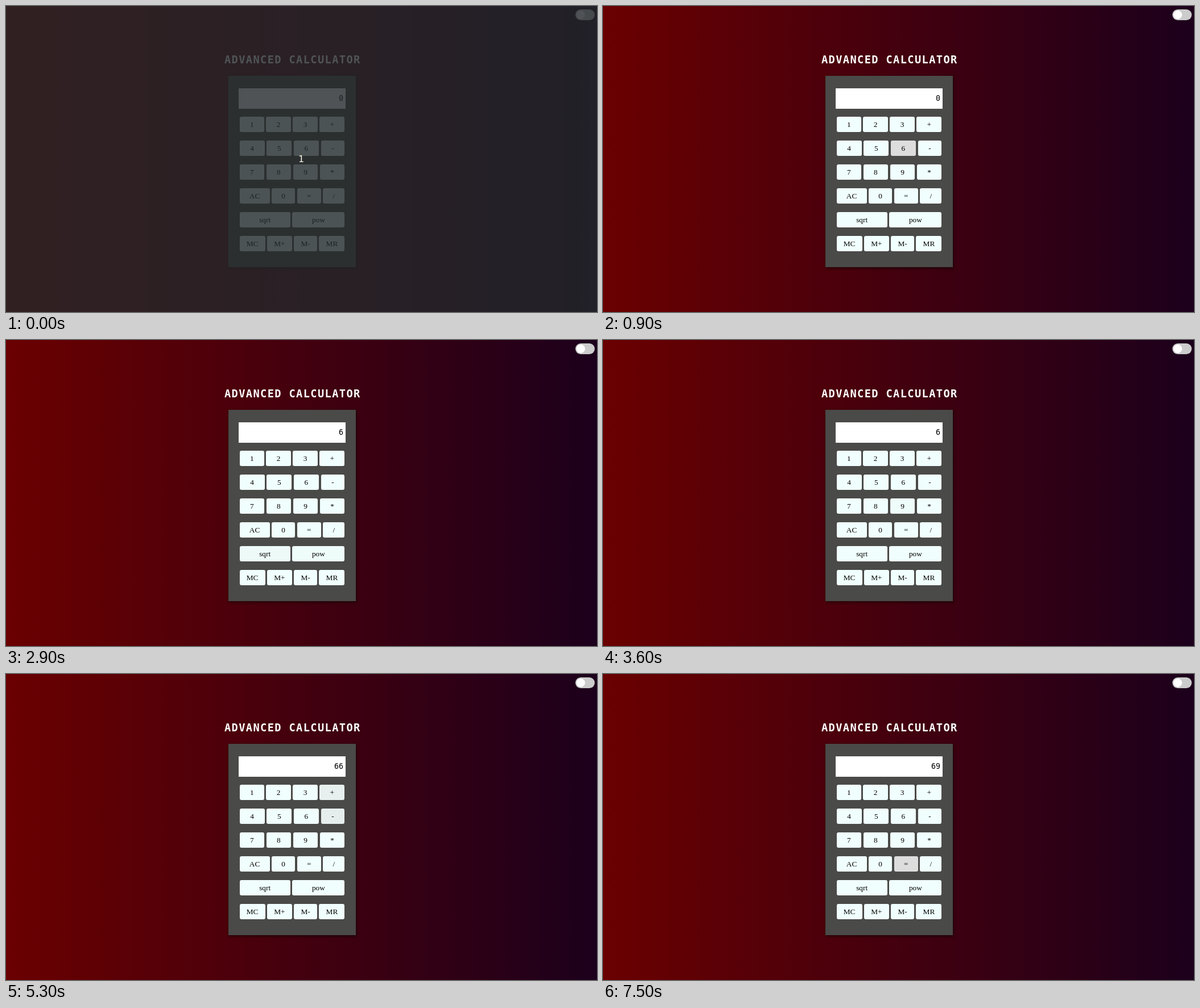
Animation of 1039 by 539 pixels, one loop 8000 ms. Source, as an HTML page:

```html
<!DOCTYPE html>
<html lang="en">
<head>
<meta charset="utf-8">
<title>Calculator</title>
<style>
  html, body { margin: 0; width: 100%; height: 100%; overflow: hidden; }
  body { position: relative; background: linear-gradient(to right, #6a0000, #1c001c); }
  body > * { position: absolute; box-sizing: border-box; }
  #title {
    left: 384px; top: 83px; color: #fff; white-space: pre;
    font: bold 18.7px/24px "DejaVu Sans Mono", monospace; letter-spacing: 1.36px;
  }
  #panel {
    left: 391px; top: 123px; width: 224px; height: 337px;
    background: #4a4a48; box-shadow: 1px 2px 5px rgba(0, 0, 0, .6);
  }
  #display {
    left: 409px; top: 145px; width: 188px; height: 36px; padding-right: 4px;
    background: #fff; color: #000; text-align: right;
    font: 13.33px/35px "DejaVu Sans Mono", monospace;
  }
  .row { left: 410.6px; width: 184.8px; height: 27px; display: flex; gap: 3.6px; }
  .row span {
    flex: 1 1 auto; border-radius: 3px; text-align: center; color: #000;
    font: 13.33px/27px "Liberation Serif", serif;
  }
  #switch { left: 1001px; top: 6px; width: 34px; height: 19px; border-radius: 10px; background: #ccc; }
  #knob { left: 1003px; top: 8px; width: 15px; height: 15px; border-radius: 50%; background: #fff; }
  #veil { inset: 0; background: rgba(36, 40, 43, .8); }
  #count {
    left: 499px; top: 260px; width: 40px; text-align: center; color: #fff8ea;
    font: 16px/20px "DejaVu Sans", sans-serif;
  }
</style>
</head>
<body>
<div id="title">ADVANCED CALCULATOR</div>
<div id="panel"></div>
<div id="display">0</div>
<div id="switch"></div>
<div id="knob"></div>
<script>
const LOOP = 8000, STEP = 100, FADE = 300;
const IDLE = [240, 255, 253], HOVER = [221, 221, 221];

// Pointer visits: key, time entered, time left
const visits = [
  ['5', 530, 620], ['6', 610, 2150],
  ['9', 2150, 2210], ['=', 2210, 2290], ['pow', 2290, 2380],
  ['sqrt', 2380, 2720], ['pow', 2620, 2720], ['M+', 2970, 3080],
  ['=', 3120, 3240], ['9', 3230, 3400],
  ['6', 3750, 4360], ['+', 4370, 5200],
  ['-', 5210, 5300], ['6', 5300, 5440], ['3', 5450, 6050],
  ['6', 6050, 6150], ['9', 6150, 6250], ['=', 6250, 6400],
  ['pow', 6430, 6930], ['=', 6940, LOOP],
];
const readings = [[0, '0'], [1900, '6'], [4100, '66'], [5900, '3'], [7500, '69']];

const keys = {};
['1 2 3 +', '4 5 6 -', '7 8 9 *', 'AC 0 = /', 'sqrt pow', 'MC M+ M- MR'].forEach((labels, i) => {
  const row = document.createElement('div');
  row.className = 'row';
  row.style.top = 195 + 42 * i + 'px';
  for (const label of labels.split(' ')) {
    const key = keys[label] = document.createElement('span');
    key.textContent = label;
    row.append(key);
  }
  document.body.append(row);
});
document.body.insertAdjacentHTML('beforeend', '<div id="veil"></div><div id="count">1</div>');

const $ = id => document.getElementById(id);
const easeOut = x => 1 - (1 - Math.min(1, Math.max(0, x))) ** 2;
const hoverLevel = (t, enter, leave) =>
  easeOut((Math.min(t, leave) - enter) / FADE) * (1 - easeOut((t - leave) / FADE));

function render(t) {
  for (const label in keys) {
    const level = Math.max(0, ...visits.filter(v => v[0] === label)
      .map(([, enter, leave]) => hoverLevel(t, enter, leave)));
    keys[label].style.background =
      `rgb(${IDLE.map((c, i) => Math.round(c + (HOVER[i] - c) * level))})`;
  }
  $('display').textContent = readings.filter(r => r[0] <= t).pop()[1];
  $('veil').hidden = $('count').hidden = t >= 100;
}

const start = performance.now();
function tick() {
  const t = (performance.now() - start) % LOOP;
  render(Math.floor(t / STEP) * STEP);
  requestAnimationFrame(tick);
}
tick();
</script>
</body>
</html>
```
